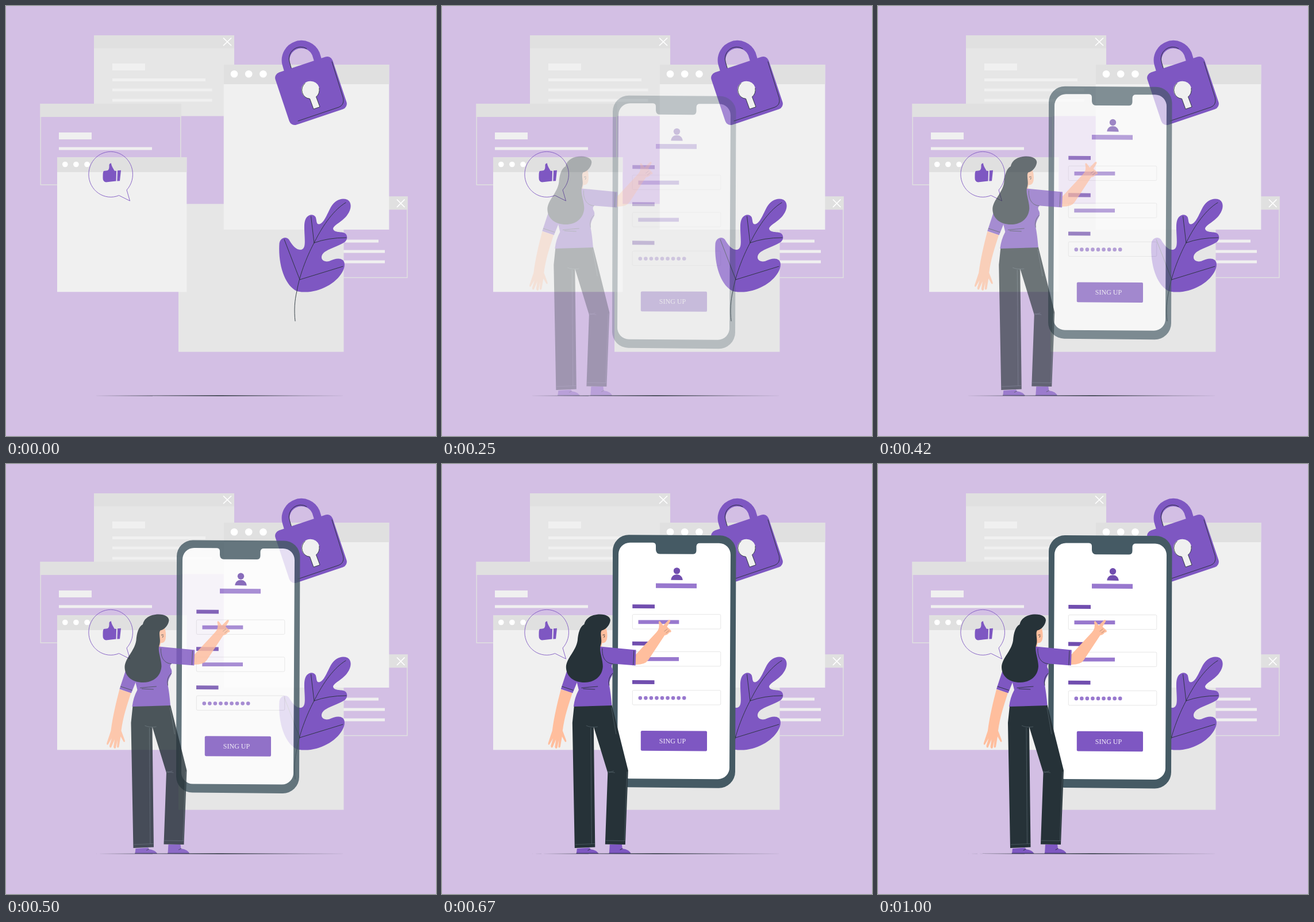
Animation, 748 px wide and 748 px high, one loop 1.04 s. Source, as an HTML page:

```html
<!DOCTYPE html>
<html lang="en">
<head>
<meta charset="utf-8">
<title>Sign-up illustration</title>
<style>
  html, body { margin: 0; width: 100%; height: 100%; overflow: hidden; background: #d3bfe4; }
  svg { display: block; width: 100%; height: 100%; }
  .header { fill: #e0e0e0; }
  .frame { fill: none; stroke: #e0e0e0; stroke-width: 1.5; }
  .panel { fill: #e6e6e6; }
  .pale { fill: #f0f0f0; }
  .white { fill: #fff; }
  .cross { fill: none; stroke: #fff; stroke-width: 1.7; }
  .purple { fill: #7e57c2; }
  .deep { fill: #714eaf; }
  .light { fill: #9878ce; }
  .dark { fill: #263238; }
  .skin { fill: #ffbe9d; }
  .ink { fill: none; stroke: #263238; stroke-width: .9; stroke-linecap: round; }
  .seam { fill: none; stroke: #56666e; stroke-width: .7; }
  .field { fill: none; stroke: #dcdcdc; stroke-width: .7; }
</style>
</head>
<body>
<svg viewBox="0 0 748 748">
  <rect width="748" height="748" fill="#d3bfe4"/>

  <g id="windows">
    <rect class="panel" x="153" y="51" width="244" height="140.5"/>
    <rect class="header" x="153" y="51" width="244" height="22.5"/>
    <path class="cross" d="M378 55.5l14 13.5m0-13.5l-14 13.5"/>
    <path class="pale" d="M185 100h57v12h-57zM185 126h162v5H185zM185 143.5h173.500v5H185zM185 161.500h173.500v5H185z"/>

    <rect class="frame" x="60.200" y="170.700" width="243.600" height="140.300"/>
    <rect class="header" x="59.500" y="170" width="245" height="23"/>
    <path class="pale" d="M92 220h57v12H92zM92 245.500h162v5H92z"/>

    <rect class="frame" x="454" y="332" width="244" height="140.500"/>
    <rect class="header" x="454" y="331.300" width="244.700" height="23"/>
    <path class="cross" d="M680 336.500l13.500 13.500m0-13.500l-13.500 13.500"/>
    <path class="pale" d="M486 406.500h162v5H486zM486 424.500h173v5H486zM486 442.500h173v5H486z"/>

    <rect class="panel" x="300" y="344.300" width="287.500" height="257.300"/>

    <rect class="pale" x="89" y="263" width="225.300" height="234.300"/>
    <rect class="header" x="89" y="263" width="225.300" height="26"/>
    <rect class="pale" x="378.700" y="102" width="287.700" height="287"/>
    <rect class="header" x="378.700" y="102" width="287.700" height="34"/>
    <g id="windowDots" class="white"></g>
  </g>

  <g id="bubble">
    <path d="M196.500 329.500L215.500 339L210 320A38.300 39.500 0 1 0 196.500 329.500Z" fill="none" stroke="#7e57c2" stroke-width=".9"/>
    <path class="purple" d="M170 287L176 286.300C180 285 179.500 280 179.500 276Q180.500 273 183 273.500C183.500 279 186 281 188.500 286.500L192 287L191.500 304.500L174 306.500Q168.300 305.500 168.500 299Q168.300 288 170 287ZM194 286.300L200 285.800L198 304.300L193.300 304.500Z"/>
  </g>

  <g id="lock">
    <path d="M492 117L487 100A27.500 27.500 0 0 1 539 83L544 99" fill="none" stroke="#7e57c2" stroke-width="13.500"/>
    <path class="ink" d="M497 110.500L493.300 98A20.400 20.400 0 0 1 523 74"/>
    <rect class="purple" x="-52.500" y="-48" width="105" height="96" rx="10" transform="translate(530.500 147.500) rotate(-18.500)"/>
    <path class="ink" d="M567 97L586.500 160Q589 172 579 176L508 200"/>
    <path class="pale" d="M530 130.700A15.300 15.300 0 0 1 539.500 158L546 175.500L535 179.300L528.500 161.300A15.300 15.300 0 0 1 530 130.700Z"/>
    <path class="ink" d="M520 134.500A15.300 15.300 0 0 0 528.500 161.300L535 179.300L546 175.500L539.500 158Q546 153 545 143"/>
  </g>

  <g id="leaf">
    <path class="purple" d="M506 496C486 487 473 452 475.500 413C477 403 487 400 492 406C496 413 503 424 512 424C521 424 520 412 519.500 400C519 388 518 378 521 371C525 362 535 361 538.500 367C541 373 539 380 545 379.500C553 378 558 363 565 350C573 337 584 333 594 337C602 342 601 353 594 363C586 375 571 380 569 387C570 395 583 392 589 395C595 398 595 408 587 412C576 419 553 424 549.500 434C547 441 553 446 562 444C571 440 580 437 586 442C591 447 589 456 585 463C572 486 536 503 506 496Z"/>
    <path class="ink" d="M503 548C501 530 502 512 506 496C511 465 526 430 537 410C552 380 571 354 591 342M511 476L484 406M511 476L586 453M536 412L530.500 366M536 412Q560 403 592 403"/>
  </g>

  <path class="dark" opacity=".85" d="M151 678L373 677.100L595 678L373 678.800Z"/>

  <g id="phone">
    <path fill="#455a64" d="M325 124L483 125A28 28 0 0 1 511.500 153L510 536A28.500 28.500 0 0 1 481 564.500L324 563A28 28 0 0 1 296 535L297 152A28 28 0 0 1 325 124Z"/>
    <path class="white" d="M327 137.500L367 137.600Q372 138 372 143V150Q372.500 157 379 157.200L437 157.500Q442.500 157 442.500 151V144Q443 138.500 448 138.500H482A20 20 0 0 1 502 159L500 528A20 20 0 0 1 480 549L325 548A20 20 0 0 1 305 527L307 158A20 20 0 0 1 327 137.500Z"/>
    <circle class="deep" cx="408.500" cy="186.700" r="5.700"/>
    <path class="deep" d="M398.300 202.500C399 190 418 190 418.700 202.900Z"/>
    <path class="light" d="M372 208.300L443 208.700V217L372 216.600Z"/>
    <path class="deep" d="M331.300 245L370 245.300V252L331.300 251.700ZM331 309.600L369.800 309.900V316.700L331 316.400ZM331 376.700L369.500 377V383.800L331 383.500Z"/>
    <path class="light" d="M341.500 272.200H412.300V279H341.500ZM341.300 336.800H412V343.500H341.300Z"/>
    <g id="formFields"></g>
    <path class="purple" d="M348 464.800L459 465.200Q461 465.300 461 467.300V498Q461 500.200 459 500.200L348 499.600Q345.800 499.500 345.800 497.500V467Q345.800 464.800 348 464.800Z"/>
    <text x="401" y="486.500" text-anchor="middle" fill="#f3edfa" font-size="12" font-family="'Liberation Serif', 'Times New Roman', serif">SING UP</text>
  </g>

  <g id="woman">
    <path class="skin" d="M206 392C200 415 194 440 191 464L184 485Q183 489.500 186 488L192.500 477L188.500 490Q188.500 494.500 191.500 493L197.500 479L195.500 492Q196.500 496.500 199.500 494L202.500 480L201.500 492Q203 495 205 492L208 474L213 483Q216.500 485 215 480L209 464C212 440 219 420 226 398Z"/>
    <path class="purple" d="M219 352L206 391.500L226.500 398.500L236 375Z"/>
    <path class="ink" d="M208 387L227.500 393.500"/>

    <path class="purple" d="M234 669L256 667.500L257 670Q270 672 271 678H233ZM291 662L312 661.500L313 669Q326 671 327.500 678H290Z"/>
    <path class="ink" stroke-width=".6" d="M233 677.200L271 677.200M290 677.200L327 677.200M253 672L257 670M309 671L313 669"/>
    <path class="dark" d="M229 421L294.500 419L323 533L318 662L283 661.500L287.500 537L263 457L265.500 666.500L230 668L226 450Z"/>
    <path class="seam" d="M250 455Q258 459 270 457M258 459L259.500 661M231 662L265 660.500M294 424L302 470M321 535L316.500 655M284 655L318 655.500M287 535L300 537M289 537L298 534"/>

    <path class="skin" d="M274 289L284 283.500Q288 294 286 305Q284 312 277.500 311.500L276 323L264 330Z"/>
    <path class="ink" d="M279 297.500L282 297M281 301.500L282 299"/>
    <path class="purple" d="M262 322L277 318L300 345Q292 349 295 355Q299 361 295 368Q290 376 290 384Q293 400 294.500 420L228 422Q230 406 237 393L233 376L232 340Z"/>
    <path class="skin" d="M333 335L372 293Q379 286 376 275Q377 271.500 380 275.500L384 281L393 271.700Q397 269.800 396 274L390.500 283L397.500 289.500Q399 293 394.500 293Q391.500 297.500 386.500 298L358 341Q352 350 333 349Z"/>
    <path class="ink" stroke-width=".5" opacity=".35" d="M386 291L391 287M389 294L394 290"/>
    <path class="purple" d="M274 317.500L336.800 323.500L335.800 350.500L298 347.500C283 345 276 333 274 317.500Z"/>
    <path class="ink" d="M278 321C277 338 285 347 296 347.500M333 325L332 349M242 389.500Q256 388 270 387M245 391L265 392M296 364Q287 372 290 385"/>

    <path class="dark" d="M246.500 279C249 267 261 261.500 274 261.500C285 261.500 292 266 292 272C291 281 284 288 277 289.500C273 295 279 306 275 316C272 325 279 339 279 352C278 370 264 380 247 380C229 380 215 370 215 353C216 337 232 326 235 307C236 294 239 283 246.500 279Z"/>
  </g>
</svg>

<script>
const LOOP = 1040, FPS = 24, SLIDE = 44.88, LEAD = 0.036;
const byId = id => document.getElementById(id);
const circle = (x, y, r) => `<circle cx="${x}" cy="${y}" r="${r}"/>`;
const row = (count, x, step, y, r) =>
  Array.from({ length: count }, (_, i) => circle(x + i * step, y, r)).join('');

byId('windowDots').innerHTML = row(3, 102.8, 19.1, 275.5, 4.8) + row(3, 397, 25.2, 118.3, 6.3);
byId('formFields').innerHTML =
  [262.5, 327.3, 394.5].map(y =>
    `<rect class="field" x="331.300" y="${y}" width="153.500" height="25.300" rx="2"/>`).join('') +
  `<g class="light">${row(9, 344.8, 9.55, 407.9, 3.3)}</g>`;

// Cubic Bézier easing with a slight overshoot, solved by bisection.
function ease(x) {
  if (x >= 1) return 1;
  const curve = (a, b, s) => 3 * a * s * (1 - s) ** 2 + 3 * b * s * s * (1 - s) + s ** 3;
  let low = 0, high = 1;
  for (let i = 0; i < 30; i++) {
    const mid = (low + high) / 2;
    if (curve(0.36, 0.5, mid) < x) low = mid; else high = mid;
  }
  return curve(-0.01, 1.38, low);
}

function render(time) {
  const tick = Math.floor((time % LOOP + 5.01) * FPS / 1000);
  const progress = tick < 2 ? 0 : ease(tick / FPS + LEAD);
  const shift = SLIDE * (1 - progress);
  const place = (id, x, y) => {
    byId(id).setAttribute('transform', `translate(${x} ${y})`);
    byId(id).setAttribute('opacity', Math.min(1, progress));
  };
  place('phone', 0, shift);
  place('woman', -shift, 0);
}

const start = performance.now();
function loop() {
  render(performance.now() - start);
  requestAnimationFrame(loop);
}
loop();
</script>
</body>
</html>
```
